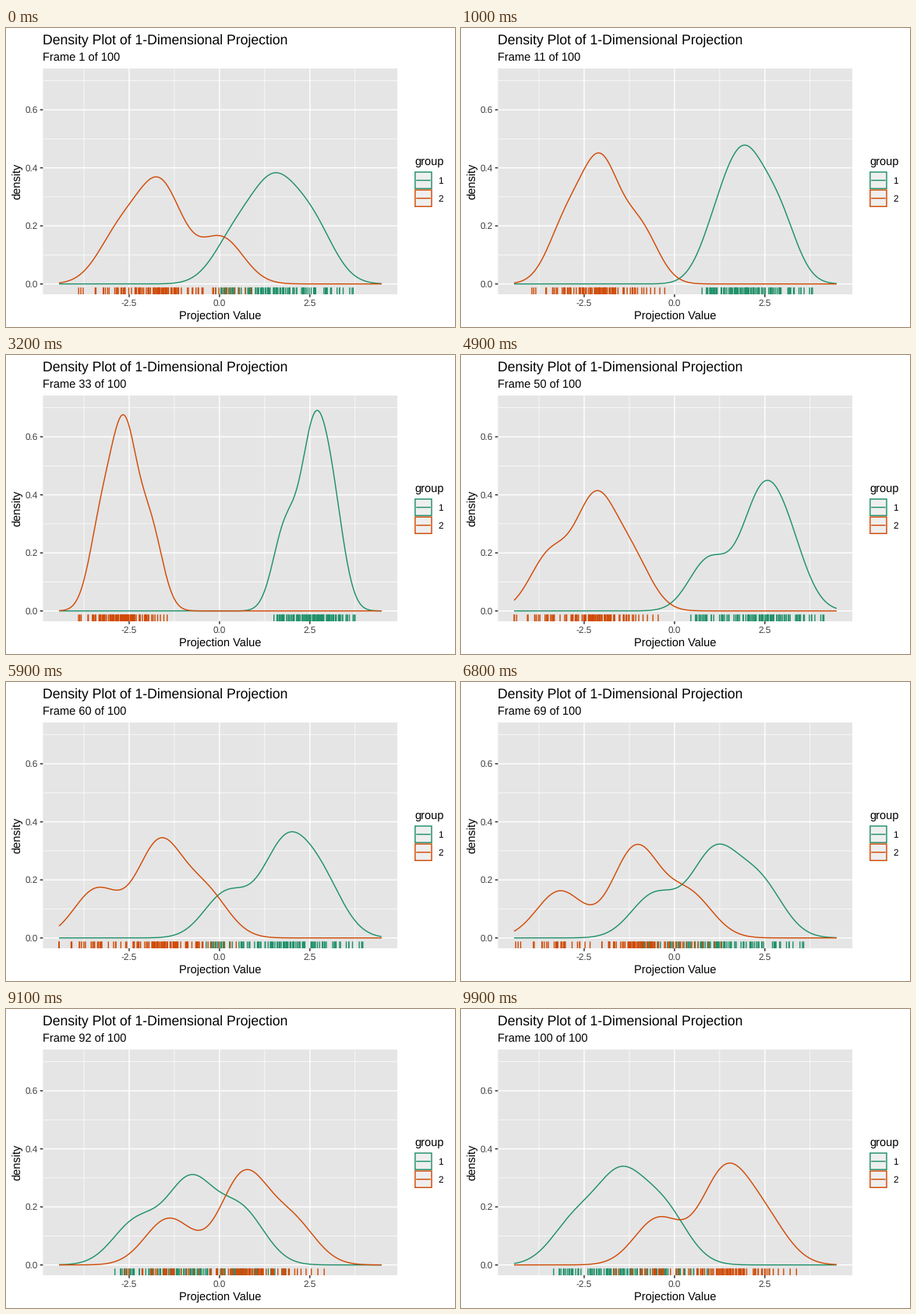
A matplotlib script for the animation above (10 s loop, 576 px wide and 384 px high).

```python
import numpy as np
import matplotlib.pyplot as plt
from matplotlib.animation import FuncAnimation
from matplotlib.patches import Rectangle

plt.rcParams.update({"font.family": "Liberation Sans", "text.hinting": "none",
                     "path.snap": False, "lines.solid_capstyle": "butt"})

W, H, DPI, FRAMES = 576, 384, 96, 100
LEFT, RIGHT, TOP, BOTTOM = 47.4, 502, 52, 342
GREEN, ORANGE = "#1e9068", "#d04a05"
THICK, THIN = 1.07, 0.535

# Each group is three clusters of fixed share; their centres pass these points.
TIMES = np.array([0, 2, 3.2, 4.9, 6.8, 8.3, 9.9])
PATHS1 = [(.45, 1.8, 1.82, .95, -.55, -1.8, -2.75),
          (1.5, 2.35, 2.58, 2.35, 1.1, -.12, -1.5),
          (2.55, 3.08, 3.1, 3.1, 2.35, 1.4, -.3)]
PATHS2 = [(-2.75, -3.17, -3.25, -3.45, -3.17, -2.25, -.45),
          (-1.63, -2.4, -2.63, -2.2, -1.07, 0, 1.38),
          (.05, -1.75, -1.92, -1.2, .4, 1.5, 2.48)]
SHARES1 = np.array([.24, .46, .30])
SHARES2 = np.array([.26, .50, .24])


def glide(points, slopes, t):
    """Cubic Hermite curve through the points at TIMES."""
    i = min(np.searchsorted(TIMES, t, side="right") - 1, len(TIMES) - 2)
    h = TIMES[i + 1] - TIMES[i]
    s = (t - TIMES[i]) / h
    return ((1 + 2 * s) * (1 - s) ** 2 * points[i] + s * s * (3 - 2 * s) * points[i + 1]
            + h * s * (1 - s) * ((1 - s) * slopes[i] - s * slopes[i + 1]))


def spread(t):
    """Clusters tighten while the groups are furthest apart."""
    return .65 - .32 * np.exp(-((t - 2.8) / 2) ** 2)


def px(x):
    return 273.9 + 46.36 * np.asarray(x)


def py(d):
    return 328.7 - 372.8 * np.asarray(d)


fig = plt.figure(figsize=(W / DPI, H / DPI), dpi=DPI, facecolor="white")
ax = fig.add_axes([0, 0, 1, 1])
ax.set(xlim=(0, W), ylim=(H, 0))
ax.axis("off")


def line(x, y, color, width, z):
    return ax.plot(x, y, color=color, lw=width, zorder=z)[0]


def label(x, y, s, size, color="black", ha="left", **kw):
    return ax.text(x, y, s, fontsize=size, color=color, ha=ha, va="baseline", **kw)


def box(x, y, w, h, **kw):
    ax.add_patch(Rectangle((x, y), w, h, **kw))


# Panel, grid and axes
box(LEFT, TOP, RIGHT - LEFT, BOTTOM - TOP, fc="#e5e5e5", lw=0, zorder=0)
for v in np.arange(-3.75, 4, 2.5):
    line([px(v)] * 2, [TOP, BOTTOM], "white", THIN, 1)
for v in np.arange(.1, .8, .2):
    line([LEFT, RIGHT], [py(v)] * 2, "white", THIN, 1)
for v in (-2.5, 0, 2.5):
    line([px(v)] * 2, [TOP, BOTTOM], "white", THICK, 2)
    line([px(v)] * 2, [BOTTOM, BOTTOM + 3.67], "#2a2a2a", THICK, 2)
    label(px(v), 357, f"{v:.1f}", 8.8, "#404040", "center")
for v in (0, .2, .4, .6):
    line([LEFT, RIGHT], [py(v)] * 2, "white", THICK, 2)
    line([LEFT - 3.67, LEFT], [py(v)] * 2, "#2a2a2a", THICK, 2)
    label(40.9, py(v) + 4.2, f"{v:.1f}", 8.8, "#404040", "right")

label(LEFT - .3, 20, "Density Plot of 1-Dimensional Projection", 13.2)
counter = label(LEFT - .3, 43, "", 11)
label((LEFT + RIGHT) / 2, 374, "Projection Value", 11, ha="center")
label(18, (TOP + BOTTOM) / 2, "density", 11, ha="center",
      rotation=90, rotation_mode="anchor")

# Legend
KEY, KX, KY = 23.04, 523.9, 184.1
label(KX, 176, "group", 11)
for i, color in enumerate((GREEN, ORANGE)):
    y = KY + i * KEY
    box(KX, y, KEY, KEY, fc="#efefef", lw=0, zorder=1)
    box(KX + .95, y + .95, KEY - 1.9, KEY - 1.9, fc="none", ec=color, lw=THICK, zorder=2)
    line([KX + .1 * KEY, KX + .9 * KEY], [y + KEY / 2] * 2, color, THICK, 2)
    label(554.2, y + KEY / 2 + 4.7, str(i + 1), 8.8)

xs = np.linspace(-4.44, 4.485, 512)


class Group:
    def __init__(self, paths, shares, color, z, seed, n=100):
        self.points = np.transpose(paths)
        self.slopes = np.gradient(self.points, TIMES, axis=0)
        self.shares = shares
        rng = np.random.default_rng(seed)
        self.member = rng.choice(len(shares), n, p=shares)
        self.offset = np.clip(rng.normal(0, .85, n), -1.9, 1.9)
        self.curve = line([], [], color, THICK, z)
        self.rug = ax.vlines([], 0, 0, color=color, lw=THICK, zorder=z)

    def update(self, t):
        centres, sd = glide(self.points, self.slopes, t), spread(t)
        bells = np.exp(-((xs[:, None] - centres) / sd) ** 2 / 2)
        self.curve.set_data(px(xs), py(bells @ self.shares / (sd * np.sqrt(2 * np.pi))))
        ticks = px(np.clip(centres[self.member] + sd * self.offset, xs[0], xs[-1]))
        self.rug.set_segments([[(x, BOTTOM - 8.7), (x, BOTTOM)] for x in ticks])


groups = [Group(PATHS1, SHARES1, GREEN, 4, 3), Group(PATHS2, SHARES2, ORANGE, 5, 8)]


def update(frame):
    counter.set_text(f"Frame {frame + 1} of {FRAMES}")
    for g in groups:
        g.update(frame / 10)
    return []


anim = FuncAnimation(fig, update, frames=FRAMES, interval=100, repeat=True,
                     repeat_delay=0, blit=False)
plt.show()
```
